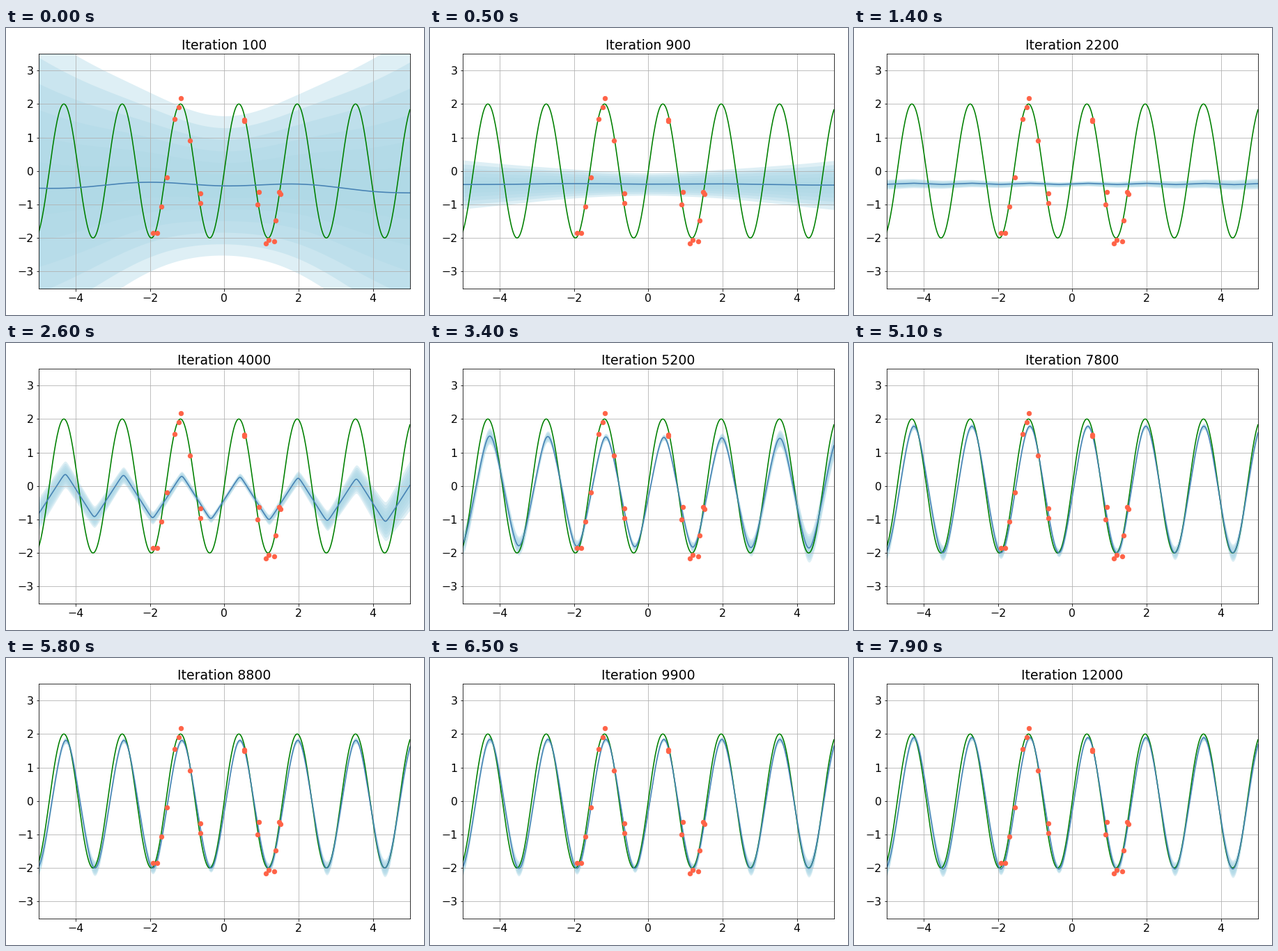
A matplotlib script for the animation above (8 s loop, 600 by 413 pixels).

```python
import numpy as np
import matplotlib.pyplot as plt
from matplotlib.animation import FuncAnimation

W, H, DPI = 600, 413, 72
FRAMES, STEP_MS = 80, 100
BANDS, BAND_ALPHA = 6, 0.4
FLAT = -0.385

plt.rcParams.update({"font.family": "DejaVu Sans", "font.size": 15.75})

x = np.linspace(-5, 5, 500)

# Noisy training samples of 2 sin(4x)
samples = np.array([
    (-1.925, -1.845), (-1.8, -1.845), (-1.69, -1.07), (-1.55, -0.195),
    (-1.335, 1.557), (-1.232, 1.91), (-1.166, 2.18), (-0.932, 0.914),
    (-0.65, -0.66), (-0.65, -0.957), (0.54, 1.525), (0.54, 1.485),
    (0.896, -0.993), (0.925, -0.63), (1.122, -2.154), (1.187, -2.05),
    (1.337, -2.1), (1.383, -1.48), (1.468, -0.62), (1.505, -0.69)])

# Untrained model: gently bent mean and a hyperbolic spread
mean0 = -0.39 - 0.014 * x - 0.007 * x ** 2 - 0.055 * np.cos(1.5 * x)
spread0 = np.hypot(2.08, 0.84 * x)


def iteration(i):
    return 100 * (1 + (3 * i + 1) // 2)


def growth(it):
    """How far the model has moved from a flat line to the wave, 0 to 1."""
    return 1 / (1 + np.exp(-(it - 4310) / 450))


def wave(it):
    """Learned mean: a zigzag that grows and rounds into a sine."""
    g = growth(it)
    tuned = np.clip((it - 6000) / 6000, 0, 1)
    amp = (1.86 + 0.1 * tuned) * g
    end = -0.12 + 0.05 * tuned
    centre = FLAT + (end - FLAT) * g ** 2 - 0.08 * g * (1 - g) * x
    lag = 0.03 - 0.006 * g * x
    sharp = 0.99 - 0.3 * g ** 4
    return centre + amp * np.arcsin(sharp * np.sin(4 * (x - lag))) / np.arcsin(sharp)


def spread(it):
    """Half width of the outermost band once the prior has collapsed."""
    g = growth(it)
    far = np.abs(x)
    trough = ((1 - np.sin(4 * x)) / 2) ** 3
    learning = 4 * g * (1 - g) * (0.06 + 0.02 * x ** 2 * (1 + 0.06 * x))
    return 0.06 + 0.01 * far + learning + g ** 4 * trough * (0.05 + 0.025 * far)


def model(it):
    prior = np.exp(-(it - 100) / 400)
    mean = wave(it) + (mean0 - FLAT) * prior
    return mean, spread0 * prior + spread(it) * (1 - prior)


fig = plt.figure(figsize=(W / DPI, H / DPI), dpi=DPI, facecolor="white")
ax = fig.add_axes([46.8 / W, 38.5 / H, 533 / W, 337.5 / H])
ax.set(xlim=(-5, 5), ylim=(-3.5, 3.5),
       xticks=range(-4, 5, 2), yticks=range(-3, 4))
ax.grid(True)
ax.plot(x, 2 * np.sin(4 * x), color="green", lw=1.6)
mean_line, = ax.plot([], [], color="steelblue", lw=1.6)
ax.plot(*samples.T, "o", color="tomato", ms=6.3, zorder=3)
title = ax.set_title("")
bands = []


def draw(i):
    it = iteration(i)
    mean, half = model(it)
    while bands:
        bands.pop().remove()
    for k in range(BANDS, 0, -1):
        edge = half * k / BANDS
        bands.append(ax.fill_between(x, mean - edge, mean + edge,
                                     color="lightblue", alpha=BAND_ALPHA, lw=0))
    mean_line.set_data(x, mean)
    title.set_text(f"Iteration {it}")
    return [mean_line, title, *bands]


anim = FuncAnimation(fig, draw, frames=FRAMES, interval=STEP_MS,
                     repeat=True, repeat_delay=0, blit=False)
plt.show()
```
